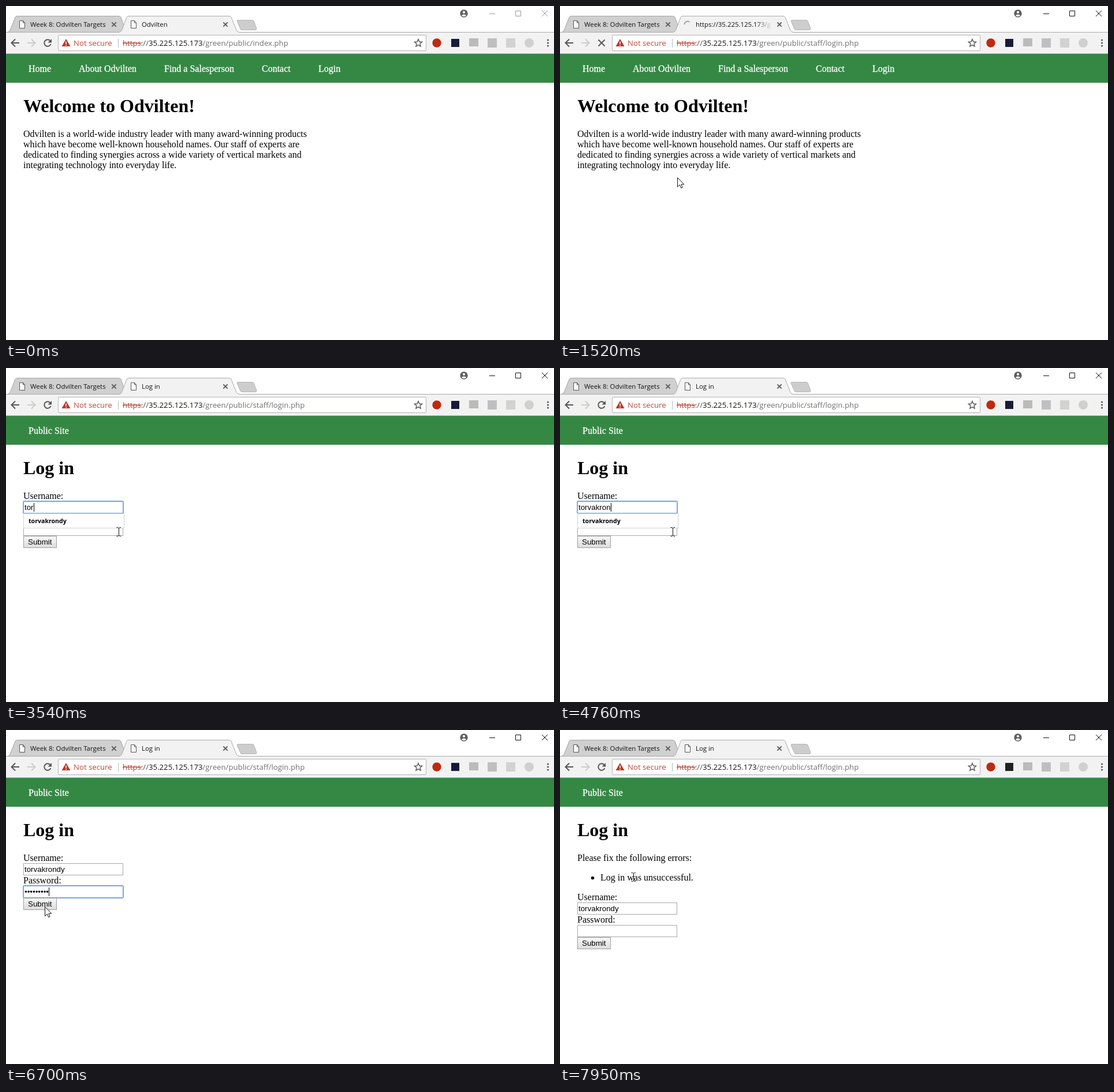
Write an HTML page that moves like this. It is 949x579 px and loops after 8000 ms.

```html
<!DOCTYPE html>
<html lang="en">
<head>
<meta charset="utf-8">
<title>Log in</title>
<style>
html, body { margin: 0; width: 100%; height: 100%; overflow: hidden; background: #fff; }
svg { display: block; width: 949px; height: 579px; }
text { white-space: pre; }
.ui { font-family: "Open Sans", "Noto Sans", sans-serif; }
.tab { font-size: 11.4px; fill: #111; }
.bar { font-size: 13.2px; }
.page { font: 16px "Liberation Serif", serif; }
.h1 { font-size: 32px; font-weight: bold; }
.field { font: 13.33px "Liberation Sans", sans-serif; }
.line { fill: none; stroke: #555; }
.nav { fill: #fff; stroke: #fff; stroke-width: .3px; }
rect { shape-rendering: crispEdges; }
</style>
</head>
<body>
<svg viewBox="0 0 949 579">
  <defs>
    <linearGradient id="fade"><stop stop-color="#f2f2f2" stop-opacity="0"/><stop offset="1" stop-color="#f2f2f2"/></linearGradient>
    <linearGradient id="face" x2="0" y2="1"><stop stop-color="#f8f8f8"/><stop offset="1" stop-color="#dcdcdc"/></linearGradient>
    <path id="doc" d="M.5 .5H6.5L9.5 4V13.5H.5ZM6.5 .5V4H9.5" fill="#f8f8f8" stroke="#555"/>
    <path id="cross" d="M-3.7-3.7 3.7 3.7M3.7-3.7-3.7 3.7" class="line" stroke-width="1.7"/>
  </defs>

  <!-- title bar and tabs -->
  <circle cx="793" cy="13" r="6.7" fill="#5f5f5f"/>
  <circle cx="793" cy="10.8" r="2.1" fill="#fff"/>
  <path d="M788.8 16.6Q793 12.5 797.2 16.6Q793 20 788.8 16.6Z" fill="#fff"/>
  <path id="winButtons" d="M837 13.5H847M882.5 8.5H891.5V17.5H882.5ZM928 8 938 18M938 8 928 18" fill="none"/>
  <path d="M3 45.5Q6 45 7.5 41L16 19.5Q17 17.5 19 17.5H195Q198 17.5 199 19.5L208 45.5Z" fill="#d0d0d0" stroke="#a3a3a3"/>
  <path d="M400 26Q400 24.5 402 24.5H426Q428 24.5 429 26L434 39Q434 41.5 432 41.5H409Q407 41.5 406 40Z" fill="#cdcdcd" stroke="#b5b5b5"/>
  <rect y="46" width="949" height="37" fill="#f2f2f2"/>
  <path d="M0 45.5H197M403 45.5H949" stroke="#a9a9a9"/>
  <path d="M196 46V45.5Q199 45 200.5 42L209 19.5Q210 17.5 212 17.5H386Q389 17.5 390 19.5L399 42Q400 45 404 45.5V46Z" fill="#f2f2f2"/>
  <path d="M196 45.5Q199 45 200.5 42L209 19.5Q210 17.5 212 17.5H386Q389 17.5 390 19.5L399 42Q400 45 404 45.5" fill="none" stroke="#a9a9a9"/>
  <use href="#doc" x="23" y="25"/>
  <use href="#doc" x="216" y="25" id="favicon"/>
  <path id="spinner" d="M-5.5 0A5.5 5.5 0 0 1 3.5-4.2" fill="none" stroke="#a0a0aa" stroke-width="2"/>
  <g class="ui tab">
    <text x="42" y="36">Week 8: Odvilten Targets</text>
    <text x="235" y="36" id="tabTitle"></text>
  </g>
  <rect x="338" y="20" width="30" height="22" fill="url(#fade)"/>
  <use href="#cross" x="187" y="32"/>
  <use href="#cross" x="380" y="32"/>

  <!-- toolbar -->
  <path d="M0 82.5H949" stroke="#bcbcbc"/>
  <path d="M23 64H10M16 57.5 9.5 64 16 70.5" class="line" stroke-width="2"/>
  <path d="M37 64H50M44 57.5 50.5 64 44 70.5" fill="none" stroke="#ccc" stroke-width="2"/>
  <g id="reload">
    <path d="M76.3 60A5.8 5.8 0 1 0 77.5 66" class="line" stroke-width="2"/>
    <path d="M79 57V63.5H72.5Z" fill="#555"/>
  </g>
  <path id="stop" d="M66.5 58.5 77.5 69.5M77.5 58.5 66.5 69.5" class="line" stroke-width="1.9"/>
  <rect x="90.5" y="50.5" width="637" height="27" rx="2" fill="#fff" stroke="#b4b4b4"/>
  <path d="M104 57 111.5 70H96.5Z" fill="#b83a2d"/>
  <path d="M104 61.5V66M104 67.2V69" stroke="#fff" stroke-width="1.5"/>
  <path d="M194.5 57V72" stroke="#b8b8b8"/>
  <g class="ui bar">
    <text x="117" y="69" fill="#b8483a">Not secure</text>
    <text x="202" y="69" fill="#707070"><tspan fill="#b83a2d">https</tspan><tspan fill="#555">://</tspan><tspan fill="#111">35.225.125.173</tspan>/green/public/<tspan id="file"></tspan></text>
  </g>
  <path d="M202 64.5H235" stroke="#b83a2d"/>
  <path d="M714 57.5 715.9 62 720.5 62.4 717 65.4 718.1 70 714 67.6 709.9 70 711 65.4 707.5 62.4 712.1 62Z" class="line" stroke-width="1.4"/>
  <circle cx="746" cy="64" r="7.7" fill="#bd2a10"/>
  <rect x="771" y="57" width="14" height="14" id="badge"/>
  <rect x="802" y="56" width="16" height="14" fill="#bbb"/>
  <rect x="834" y="56" width="16" height="16" fill="#bfbfc1"/>
  <rect x="866" y="56" width="16" height="16" fill="#d2d2d2"/>
  <circle cx="906" cy="64" r="8" fill="#d0d0d0"/>
  <g fill="#555"><circle cx="938.5" cy="59" r="1.6"/><circle cx="938.5" cy="64" r="1.6"/><circle cx="938.5" cy="69" r="1.6"/></g>

  <!-- page -->
  <rect y="83" width="949" height="50" fill="#358844"/>
  <g class="page" id="home">
    <g class="nav">
      <text x="39" y="114">Home</text>
      <text x="126" y="114">About Odvilten</text>
      <text x="274" y="114">Find a Salesperson</text>
      <text x="443" y="114">Contact</text>
      <text x="541" y="114">Login</text>
    </g>
    <text x="30" y="184" class="h1">Welcome to Odvilten!</text>
    <text x="30" y="227">Odvilten is a world-wide industry leader with many award-winning products</text>
    <text x="30" y="245">which have become well-known household names. Our staff of experts are</text>
    <text x="30" y="263">dedicated to finding synergies across a wide variety of vertical markets and</text>
    <text x="30" y="281">integrating technology into everyday life.</text>
  </g>
  <g class="page" id="login">
    <text x="39" y="114" class="nav">Public Site</text>
    <text x="30" y="184" class="h1">Log in</text>
    <g id="errors">
      <text x="30" y="227">Please fix the following errors:</text>
      <circle cx="56.5" cy="256.5" r="2.8"/>
      <text x="70" y="261">Log in was unsuccessful.</text>
    </g>
    <g id="form">
      <text x="30" y="227">Username:</text>
      <text x="30" y="266">Password:</text>
      <rect x="30.5" y="231.5" width="172" height="20" fill="#fff" stroke="#a9a9a9"/>
      <rect x="30.5" y="270.5" width="172" height="20" fill="#fff" stroke="#a9a9a9"/>
      <rect id="ring" x="30" width="173" height="21" rx="1.5" fill="none" stroke="#7ba2e4" stroke-width="1.8" style="shape-rendering:auto"/>
      <rect x="30.5" y="291.5" width="57" height="20" rx="1" fill="url(#face)" stroke="#a0a0a0"/>
      <g class="field">
        <text x="38" y="306">Submit</text>
        <text x="32" y="246" id="user"></text>
        <text x="32" y="285" id="pass"></text>
      </g>
      <rect id="caret" width="1" height="15"/>
      <g id="hint">
        <rect x="30.5" y="252.5" width="174" height="25" fill="#fff" stroke="#d2d2d2"/>
        <text x="39" y="269" class="ui" font-size="10.6" font-weight="700">torvakrondy</text>
      </g>
    </g>
  </g>

  <!-- pointers -->
  <g id="pointer">
    <path id="arrow" d="M.5 .5V16.5L4.3 13 6.8 18.6 9.2 17.5 6.8 12.2H11.8Z" fill="#fff" stroke="#111"/>
    <path id="beam" d="M-3.5-7.5H-1.5L.5-6.5 2.5-7.5H4M-3.5 7.5H-1.5L.5 6.5 2.5 7.5H4M.5-6.5V6.5" fill="none" stroke="#111"/>
    <path id="hand" d="M-1.5 11V1Q0-1 1.5 1V7Q3.5 5.5 4.5 7.5 6.5 6.5 7.5 8.5 10 8 10.5 10V15L8.5 21H0L-5 13.5Q-5.5 10.5-3 11L-1.5 13Z" fill="#fff" stroke="#111"/>
  </g>
</svg>
<script>
const $ = id => document.getElementById(id);
const show = (id, on) => $(id).style.display = on ? "" : "none";
const between = (t, a, b) => t >= a && t < b;

const LOOP = 8000, USER = "torvakrondy";
const OPEN = 1640, FAILED = 7250;
const keys = [3230, 3390, 3540, 3690, 3820, 4020, 4480, 4560, 4760, 4850, 4940];
const dots = Array.from({length: 9}, (_, i) => 6320 + i * 40);

// time, x, y, pointer shape until the next stop
const path = [
  [110, 757, 550, "arrow"], [240, 650, 380, "arrow"], [370, 470, 210, "arrow"],
  [450, 426, 130, "arrow"], [620, 554, 80, "arrow"], [770, 554, 80, "arrow"],
  [830, 557, 100, "hand"], [900, 559, 109, "hand"], [1100, 559, 109, "hand"],
  [1180, 500, 150, "arrow"], [1510, 203, 297, "arrow"], [1550, 203, 297, "arrow"],
  [1830, 150, 303, "arrow"], [1880, 146, 298, "arrow"], [2000, 120, 251, "beam"],
  [2060, 116, 242, "beam"], [2440, 116, 242, "beam"], [2490, 130, 253, "arrow"],
  [2610, 175, 273, "beam"], [2720, 195, 284, "beam"], [5400, 195, 284, "beam"],
  [5460, 212, 278, "arrow"], [5620, 340, 253, "arrow"], [5680, 340, 253, "arrow"],
  [5860, 200, 272, "beam"], [6000, 120, 281, "beam"], [6480, 120, 281, "beam"],
  [6590, 90, 294, "arrow"], [6690, 67, 306, "arrow"], [7250, 67, 306, "arrow"],
  [7540, 93, 299, "arrow"], [7740, 93, 299, "arrow"], [7850, 112, 275, "beam"],
  [7950, 127, 255, "beam"], [LOOP, 127, 255, "beam"]
];

function movePointer(t) {
  show("pointer", t >= path[0][0]);
  const i = path.findIndex(p => p[0] > t);
  if (i < 1) return;
  const [t0, x0, y0, shape] = path[i - 1], [t1, x1, y1] = path[i];
  const k = (t - t0) / (t1 - t0), mix = (a, b) => Math.round(a + (b - a) * k);
  $("pointer").setAttribute("transform", `translate(${mix(x0, x1)} ${mix(y0, y1)})`);
  for (const id of ["arrow", "beam", "hand"]) show(id, id === shape);
}

function drawForm(t) {
  const failed = t >= FAILED, inPass = t >= 6040;
  const focused = between(t, 2210, 6900);
  show("errors", failed);
  $("form").setAttribute("transform", `translate(0 ${failed ? 68 : 0})`);
  $("user").textContent = USER.slice(0, keys.filter(k => k <= t).length);
  $("pass").textContent = failed ? "" : "•".repeat(dots.filter(d => d <= t).length);
  show("hint", between(t, keys[0], 6040));
  show("ring", focused);
  $("ring").setAttribute("y", inPass ? 270 : 231);

  const last = Math.max(...[2210, ...keys, 6040, ...dots].filter(k => k <= t));
  show("caret", focused && (t - last) % 1000 < 500);
  const text = $(inPass ? "pass" : "user");
  $("caret").setAttribute("x", Math.round(32 + (text.textContent ? text.getComputedTextLength() : 0)));
  $("caret").setAttribute("y", inPass ? 273 : 234);
}

function draw(t) {
  const opening = between(t, 1100, OPEN), loading = opening || between(t, 6950, 7450);
  $("winButtons").setAttribute("stroke", t < 1050 ? "#999" : "#111");
  $("tabTitle").textContent = opening ? "https://35.225.125.173/g" : t < OPEN ? "Odvilten" : "Log in";
  $("file").textContent = t < 1100 ? "index.php" : "staff/login.php";
  $("badge").setAttribute("fill", t < FAILED ? "#181b38" : "#222");
  show("favicon", !loading);
  show("spinner", loading);
  $("spinner").setAttribute("transform", `translate(221 32) rotate(${(t - 1520) * -.36})`);
  show("reload", !loading);
  show("stop", loading);
  show("home", t < OPEN);
  show("login", t >= OPEN);
  if (t >= OPEN) drawForm(t);
  movePointer(t);
}

function frame() {
  draw(performance.now() % LOOP);
  requestAnimationFrame(frame);
}
frame();
</script>
</body>
</html>
```
